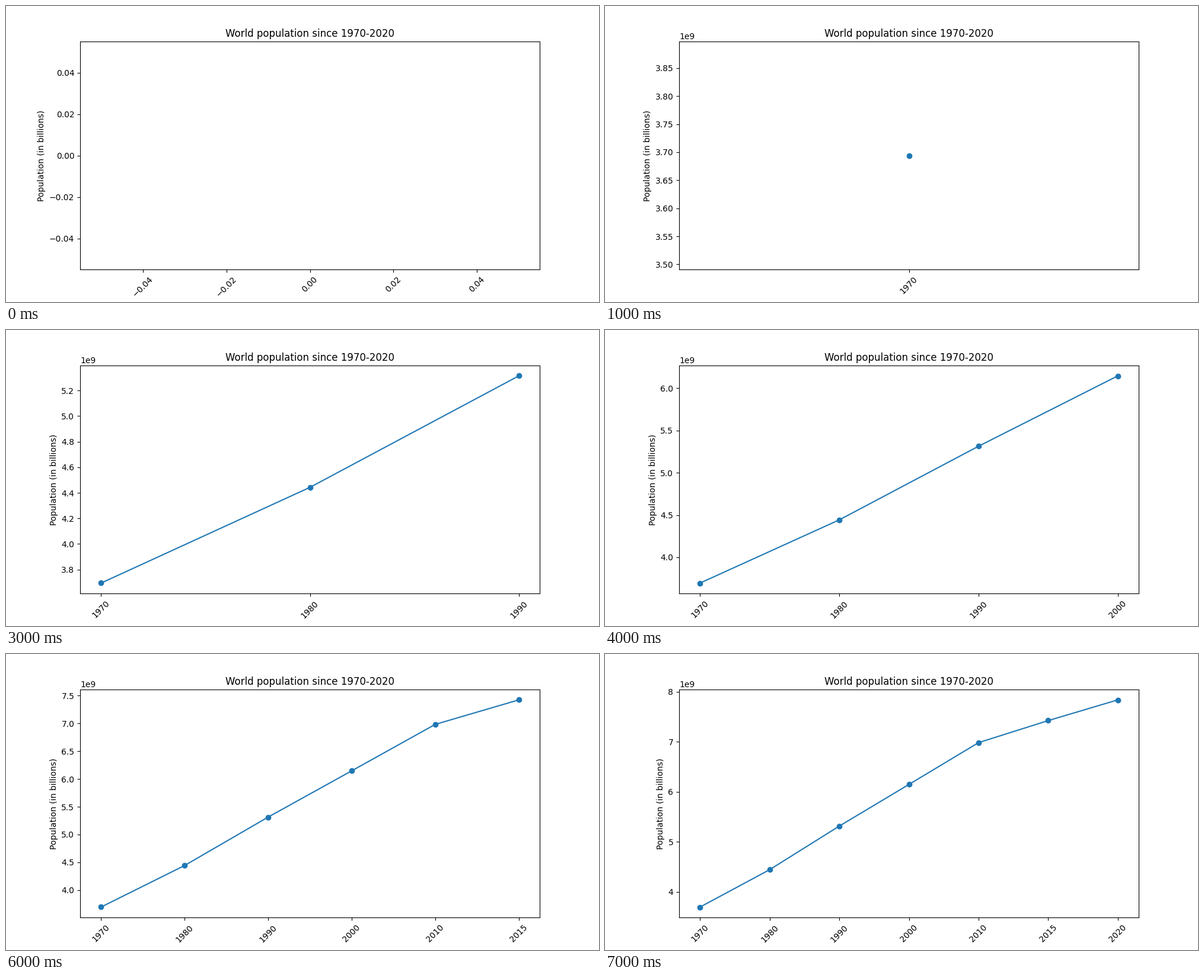
Animation of 1000x500 px, one loop 8 s. Source, as a matplotlib script:

```python
import matplotlib.pyplot as plt
from matplotlib.animation import FuncAnimation

# Every ten years up to 2010, then every five.
YEARS = [str(year) for year in (*range(1970, 2010, 10), *range(2010, 2021, 5))]
PEOPLE = [3694136661, 4442400371, 5314191665, 6147055703,
          6983784998, 7424809761, 7839250603]

fig, ax = plt.subplots(figsize=(10, 5), dpi=100)
fig.subplots_adjust(left=0.125, right=0.9, bottom=0.11, top=0.88)


def draw(count):
    """Redraw the chart with the first `count` years; the axes rescale."""
    ax.clear()
    ax.plot(YEARS[:count], PEOPLE[:count], marker="o", color="#1f77b4")
    ax.set_title("World population since 1970-2020")
    ax.set_ylabel("Population (in billions)")
    ax.tick_params(axis="x", labelrotation=45)


anim = FuncAnimation(fig, draw, frames=len(YEARS) + 1, init_func=lambda: draw(0),
                     interval=1000, repeat=True, repeat_delay=0)
plt.show()
```
